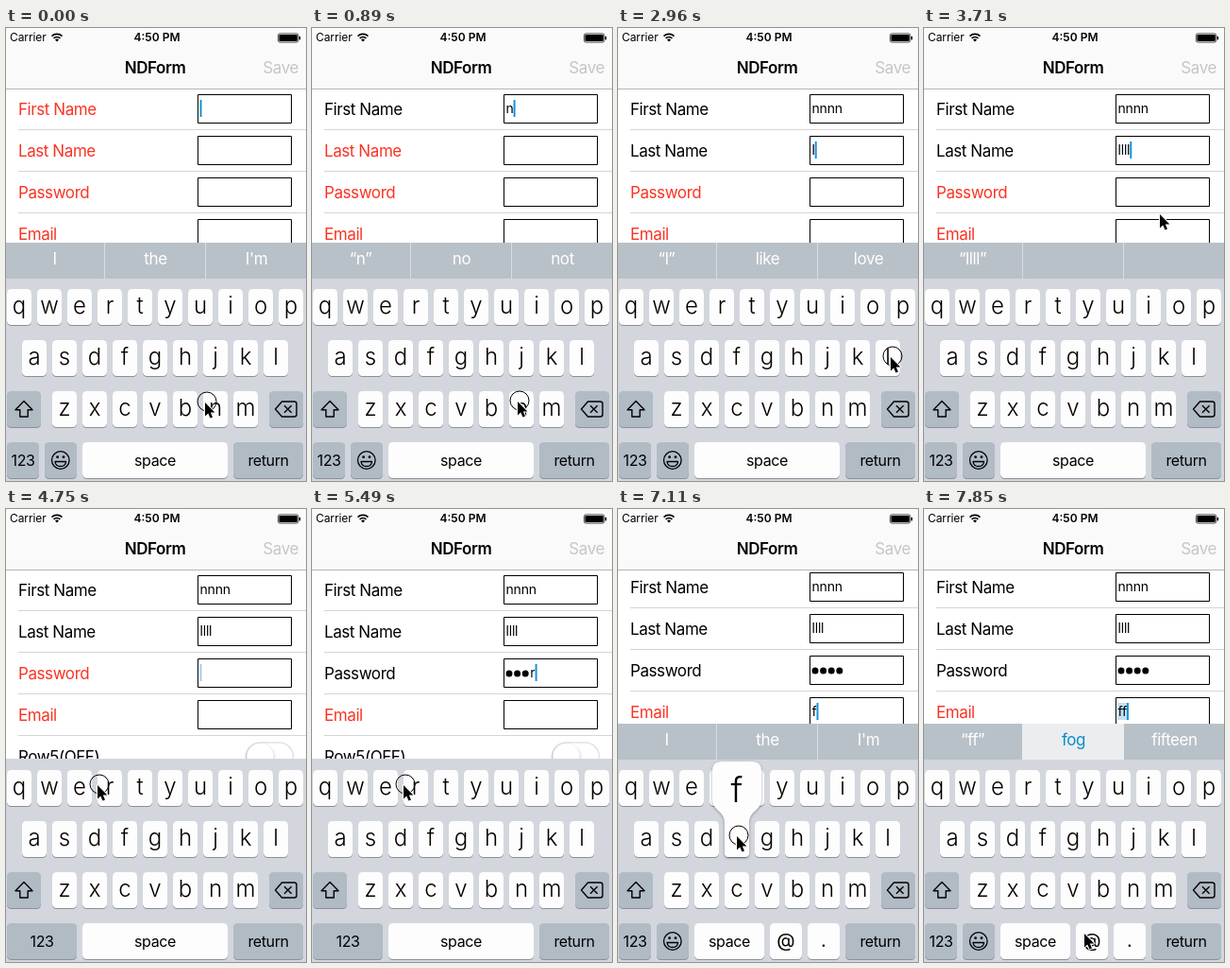
Animation, 318 px wide and 479 px high, one loop 8 s. Source, as an HTML page with a canvas:

```html
<!DOCTYPE html>
<html lang="en">
<head>
<meta charset="utf-8">
<title>Form demo</title>
<style>
  html, body { margin: 0; width: 100%; height: 100%; overflow: hidden; background: #fff; }
  canvas { display: block; width: 318px; height: 479px; }
</style>
</head>
<body>
<canvas id="stage"></canvas>
<script>
const WIDTH = 318, HEIGHT = 479, LOOP = 8000, TICKS = 54;
const canvas = document.getElementById('stage');
const ctx = canvas.getContext('2d');
const ratio = window.devicePixelRatio || 1;
canvas.width = WIDTH * ratio;
canvas.height = HEIGHT * ratio;
ctx.scale(ratio, ratio);

const RED = '#fb3323', BLUE = '#0a8bd0', SPECIAL = '#b1bbc4', BAR = '#b9c1c8', BOARD = '#d3d7dd';

// Timelines: each entry is [tick, value...]; a tick is 1/54 of the loop.
const FOCUS = [[0, 0], [15, 1], [26, 2], [41, 3]];
const TYPED = [
  [[0, 0], [5, 1], [7, 2], [10, 3], [11, 4]],
  [[0, 0], [19, 1], [21, 2], [22, 3], [24, 4]],
  [[0, 0], [33, 1], [35, 2], [36, 3], [37, 4]],
  [[0, 0], [48, 1], [50, 2]]
];
const IDLE = ['I', 'the', "I'm"];
const SUGGESTIONS = [
  [0, IDLE], [6, ['“n”', 'no', 'not']], [9, ['“nn”', 'non', 'nine'], true],
  [12, ['“nnnn”', '', '']], [15, IDLE], [20, ['“l”', 'like', 'love']],
  [22, ['“ll”', 'all', 'lol']], [24, ['“llll”', '', '']], [41, IDLE],
  [49, ['“f”', 'for', 'from']], [51, ['“ff”', 'fog', 'fifteen'], true]
];
const MODE = [[0, 'text'], [28, 'secure'], [42, 'email']];
const BOARD_TOP = [[0, 227], [28, 246], [29, 264], [43, 262], [44, 240], [45, 227]];
const SCROLL = [[0, 0], [44, -2], [45, -3]];
const CARET = [[0, 1], [1, .7], [2, .25], [3, 0], [5, 1], [32, .4], [33, 1], [41, 1], [42, 0], [44, 1]];
const POPUP = [
  [0, ''], [5, 'n'], [6, ''], [7, 'n'], [9, ''], [10, 'n'], [12, ''], [19, 'l'], [20, ''],
  [21, 'l'], [24, ''], [48, 'f'], [49, ''], [50, 'f'], [51, '']
];
const RING = [
  [0, 1], [2, 0], [5, 1], [12, 0], [15, 1], [16, 0], [19, 1], [24, 0],
  [26, 1], [28, 0], [32, 1], [39, 0], [41, 1], [42, 0], [48, 1], [52, 0]
];
const POINTER = [
  [0, 211, 396], [3, 218, 395], [11, 218, 395], [12, 235, 310], [14, 255, 131], [16, 255, 131],
  [19, 289, 348], [23, 289, 348], [24, 283, 290], [25, 250, 197], [26, 247, 172], [27, 247, 172],
  [31, 97, 292], [38, 97, 292], [39, 150, 262], [41, 245, 216], [42, 225, 250], [43, 177, 314],
  [45, 126, 346], [51, 126, 346], [53, 170, 449]
];

const entryAt = (track, tick) => track.filter(entry => entry[0] <= tick).pop();
const valueAt = (track, tick) => entryAt(track, tick)[1];

function pointerAt(tick) {
  const from = entryAt(POINTER, tick);
  const to = POINTER.find(stop => stop[0] > tick) || from;
  const u = to === from ? 0 : (tick - from[0]) / (to[0] - from[0]);
  const eased = u * u * (3 - 2 * u);
  return [1, 2].map(i => from[i] + (to[i] - from[i]) * eased);
}

function text(str, x, y, { size = 17, color = '#000', align = 'left', weight = 400, spacing = -.42 } = {}) {
  ctx.font = `${weight} ${size}px Inter, "Open Sans", sans-serif`;
  ctx.letterSpacing = spacing + 'px';
  ctx.textAlign = align;
  ctx.fillStyle = color;
  ctx.fillText(str, x, y);
}

function rect(x, y, w, h, color) {
  ctx.fillStyle = color;
  ctx.fillRect(x, y, w, h);
}

function roundRect(x, y, w, h, radius, color) {
  ctx.fillStyle = color;
  ctx.beginPath();
  ctx.roundRect(x, y, w, h, radius);
  ctx.fill();
}

function disc(x, y, radius, color = '#000') {
  ctx.fillStyle = color;
  ctx.beginPath();
  ctx.arc(x, y, radius, 0, Math.PI * 2);
  ctx.fill();
}

function strokePath(d, width = 1.4, color = '#000') {
  ctx.strokeStyle = color;
  ctx.lineWidth = width;
  ctx.lineJoin = 'round';
  ctx.stroke(new Path2D(d));
}

function withShadow(color, blur, offset, draw) {
  ctx.save();
  ctx.shadowColor = color;
  ctx.shadowBlur = blur * ratio;
  ctx.shadowOffsetY = offset * ratio;
  draw();
  ctx.restore();
}

function drawHeader() {
  rect(0, 0, WIDTH, 64, '#fafafa');
  rect(0, 64, WIDTH, 1, '#b6b6b8');
  text('Carrier', 4, 14, { size: 12, spacing: -.1 });
  strokePath('M48.5 8.6a8 8 0 0 1 11 0M50.6 10.9a5 5 0 0 1 6.8 0', 1.6);
  ctx.fillStyle = '#000';
  ctx.fill(new Path2D('M52 12.4a3 3 0 0 1 4 0L54 14.6Z'));
  text('4:50 PM', 160, 14, { size: 12, weight: 600, align: 'center', spacing: 0 });
  ctx.strokeStyle = '#000';
  ctx.lineWidth = .7;
  ctx.beginPath();
  ctx.roundRect(288.4, 5.9, 21.4, 9.2, 2);
  ctx.stroke();
  roundRect(289.4, 6.9, 19.4, 7.2, 1, '#000');
  roundRect(310.6, 8.8, 1.5, 3.6, .7, '#000');
  text('NDForm', 158, 48, { weight: 600, align: 'center' });
  text('Save', 310, 48, { color: '#c6c6c8', align: 'right' });
}

function drawToggle(x, y) {
  ctx.strokeStyle = '#e3e3e3';
  ctx.lineWidth = 1.5;
  ctx.beginPath();
  ctx.roundRect(x, y, 50, 30, 15);
  ctx.stroke();
  withShadow('rgba(0,0,0,.3)', 4, 2, () => disc(x + 15, y + 15, 14, '#fff'));
}

function drawField(row, top, tick) {
  const focused = valueAt(FOCUS, tick) === row;
  const count = valueAt(TYPED[row], tick);
  let right = 205.5;
  ctx.strokeStyle = '#000';
  ctx.lineWidth = 1;
  ctx.strokeRect(203.5, top + .5, 99, 30);

  if (row === 2) {
    const dots = focused && count ? count - 1 : count;
    for (let i = 0; i < dots; i++) disc(209 + i * 8.6, top + 16, 3.5);
    right += dots * 8.6;
    if (dots < count) {
      text('r', right, top + 20, { size: 14, spacing: 0 });
      right += ctx.measureText('r').width;
    }
  } else {
    const value = 'nl f'[row].repeat(count);
    ctx.font = '400 14px Inter, "Open Sans", sans-serif';
    ctx.letterSpacing = '-0.2px';
    right += ctx.measureText(value).width;
    if (row === 3 && tick >= 51) rect(205, top + 6, right - 205, 18, '#c6e0f4');
    text(value, 205.5, top + 20, { size: 14, spacing: -.2 });
  }
  if (focused) {
    ctx.globalAlpha = valueAt(CARET, tick);
    rect(right, top + 6, 2, 18, '#1593dc');
    ctx.globalAlpha = 1;
  }
}

function drawForm(tick) {
  const scroll = valueAt(SCROLL, tick);
  ['First Name', 'Last Name', 'Password', 'Email'].forEach((label, row) => {
    const top = 70 + row * 44 + scroll;
    const valid = row < 3 && valueAt(TYPED[row], tick) > 0;
    text(label, 13, top + 22, { color: valid ? '#000' : RED });
    drawField(row, top, tick);
    rect(13, top + 37, WIDTH - 13, 1, '#d5d4d8');
  });
  text('Row5(OFF)', 13, 268 + scroll);
  drawToggle(254.5, 247 + scroll);
}

function drawKey(x, y, w, label, { special = false, size = 24, weight = 300, dy = 26 } = {}) {
  roundRect(x, y + 1, w, 38, 4.5, '#8b9097');
  roundRect(x, y, w, 38, 4.5, special ? SPECIAL : '#fdfdfd');
  text(label, x + w / 2, y + dy, { size, weight, align: 'center', spacing: size < 20 ? -.4 : 0 });
}

const ROWS = [['qwertyuiop', 1, 276], ['asdfghjkl', 17, 330], ['zxcvbnm', 49, 384]];

function drawPopup(letter) {
  const [letters, left, y] = ROWS.find(row => row[0].includes(letter));
  const x = left + letters.indexOf(letter) * 32;
  withShadow('rgba(0,0,0,.35)', 3, 1, () => {
    ctx.fillStyle = '#fdfdfd';
    ctx.fill(new Path2D(`M${x - 3} ${y - 63}h32q10 0 10 10v30c0 12 -13 12 -13 25v32
      q0 4 -4 4h-18q-4 0 -4 -4v-32c0 -13 -13 -13 -13 -25v-30q0 -10 10 -10Z`));
  });
  text(letter, x + 13, y - 20, { size: 37, weight: 300, align: 'center', spacing: 0 });
}

function drawSuggestions(top, tick) {
  const [, words, corrected] = entryAt(SUGGESTIONS, tick);
  rect(0, top, WIDTH, 265 - top, BAR);
  if (top > 227) {
    rect(0, top, WIDTH, 265 - top, '#d0d5da');
    return;
  }
  if (corrected) rect(104, top, 108, 38, '#ebedee');
  else [104, 211].forEach(x => rect(x, top, 1, 38, '#d9dde1'));
  words.forEach((word, i) => text(word, 51.5 + i * 107, 250, {
    color: corrected && i === 1 ? BLUE : '#fff', align: 'center'
  }));
}

function drawKeyboard(tick) {
  const mode = valueAt(MODE, tick);
  const top = valueAt(BOARD_TOP, tick);
  rect(0, top, WIDTH, HEIGHT - top, BOARD);
  if (top < 264) drawSuggestions(top, tick);

  for (const [letters, left, y] of ROWS) {
    [...letters].forEach((letter, i) => drawKey(left + i * 32, y, 26, letter));
  }
  const special = { special: true, size: 16, weight: 400, dy: 25 };
  const plain = { ...special, special: false };
  drawKey(1, 384, 36, '', special);
  strokePath('M19 394.5l9 9.3h-4.8v7.2h-8.4v-7.2h-4.8Z');
  drawKey(279, 384, 36, '', special);
  strokePath('M285.5 403l7 -8h13q2.5 0 2.5 2.5v11q0 2.5 -2.5 2.5h-13ZM295 399.2l7.6 7.6M302.6 399.2l-7.6 7.6');

  drawKey(1, 438, mode === 'secure' ? 74 : 34, '123', special);
  if (mode !== 'secure') {
    drawKey(41, 438, 34, '', special);
    strokePath('M48.5 457a9.3 9.3 0 1 0 18.6 0a9.3 9.3 0 1 0 -18.6 0M52 458.5h11.6q-.6 5 -5.8 5t-5.8 -5Z', 1.3);
    disc(54.6, 453.7, 1.4);
    disc(61, 453.7, 1.4);
  }
  drawKey(81, 438, mode === 'email' ? 74 : 154, 'space', plain);
  if (mode === 'email') {
    drawKey(161, 438, 34, '@', { ...plain, size: 20 });
    drawKey(201, 438, 34, '.', { ...plain, size: 20 });
  }
  drawKey(241, 438, 74, 'return', special);

  const pressed = valueAt(POPUP, tick);
  if (pressed) drawPopup(pressed);
}

function drawPointer(tick) {
  const [x, y] = pointerAt(tick);
  if (valueAt(RING, tick)) {
    ctx.strokeStyle = '#000';
    ctx.lineWidth = 1;
    ctx.beginPath();
    ctx.arc(x + 2, y - 1, 10, 0, Math.PI * 2);
    ctx.stroke();
  }
  const arrow = `M${x} ${y}v14.5l3.3 -3.1l2.2 5.1l2.5 -1.1l-2.2 -4.9h4.6Z`;
  strokePath(arrow, 2, '#fff');
  ctx.fillStyle = '#000';
  ctx.fill(new Path2D(arrow));
}

function render(now) {
  const tick = Math.floor(((now % LOOP) + 6) / LOOP * TICKS) % TICKS;
  rect(0, 0, WIDTH, HEIGHT, '#fff');
  drawForm(tick);
  drawHeader();
  drawKeyboard(tick);
  drawPointer(tick);
}

const start = performance.now();
function loop() {
  render(performance.now() - start);
  requestAnimationFrame(loop);
}
loop();
</script>
</body>
</html>
```
